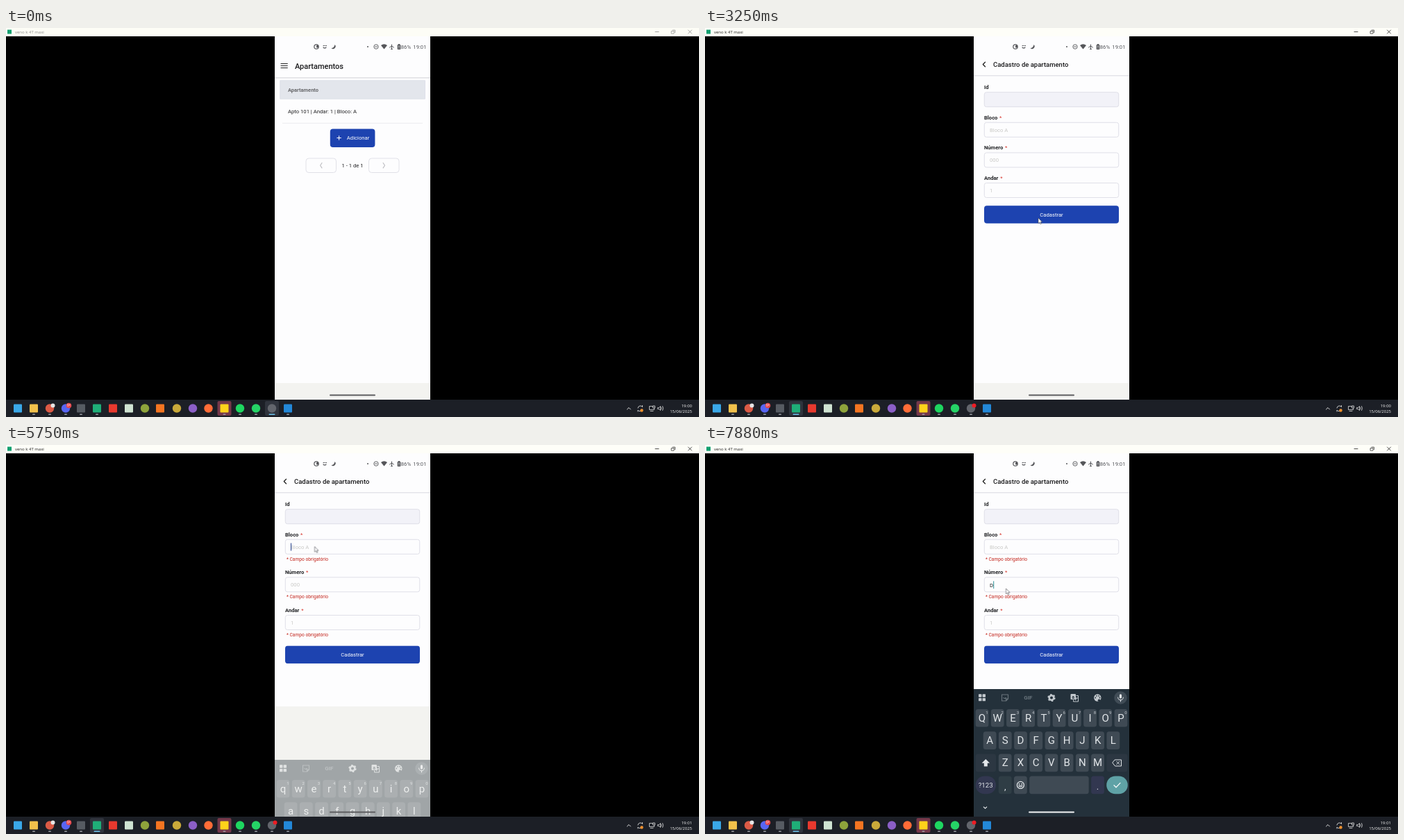
An HTML page that plays this animation: 998x561 px, repeating every 8 s.

```html
<!DOCTYPE html>
<html lang="pt-BR">
<head>
<meta charset="utf-8">
<title>Cadastro de apartamento</title>
<style>
html, body { margin: 0; width: 100%; height: 100%; overflow: hidden; background: #000; }
svg { display: block; width: 998px; height: 561px; font-family: Roboto, sans-serif; }
.desk { font-family: "Open Sans", sans-serif; font-size: 6px; }
.line { fill: none; stroke-linecap: round; stroke-linejoin: round; }
.anim { animation: 8s step-end infinite; }

/* percentages are ms / 80, set just ahead of each 125 ms tick */
#list, #form { transform-origin: 499px 274.5px; }
#list { animation-name: zoomOut; }
#form { opacity: 0; animation-name: zoomIn; }
@keyframes zoomOut { 18.6% { transform: scale(1.08); } 20.2% { transform: scale(1.14); } 23.3%, 100% { transform: scale(1.15); } }
@keyframes zoomIn {
  0% { opacity: 0; transform: scale(.9); }
  20.2% { opacity: 1; transform: scale(.975); }
  21.8% { opacity: 1; transform: scale(.995); }
  23.3%, 100% { opacity: 1; transform: none; }
}

.shift { animation-name: shift; }
@keyframes shift { 46.8%, 100% { transform: translateY(var(--d)); } }
.error { opacity: 0; animation-name: error; }
@keyframes error { 46.8%, 100% { opacity: 1; } }

.idle { animation-name: idle; }
.active { opacity: 0; animation-name: active; }
@keyframes idle { 14%, 100% { opacity: 0; } }
@keyframes active { 14%, 100% { opacity: 1; } }
.rec { opacity: 0; animation-name: rec; }
@keyframes rec { 1.5%, 100% { opacity: 1; } }
.before { animation-name: before; }
.after { opacity: 0; animation-name: after; }
@keyframes before { 67.1%, 100% { opacity: 0; } }
@keyframes after { 67.1%, 100% { opacity: 1; } }

#gap { transform: translateY(160px); animation-name: gap; }
@keyframes gap { 71.7% { transform: translateY(25px); } 73.3%, 100% { transform: none; } }
#keyboard { opacity: 0; animation-name: rise; }
@keyframes rise {
  0% { opacity: 0; transform: translateY(184px); }
  71.7% { opacity: .4; transform: translateY(102px); }
  73.3% { opacity: .88; transform: translateY(22px); }
  74.8%, 100% { opacity: 1; transform: none; }
}
#home { fill: #5c5c5f; animation-name: home; }
@keyframes home { 73.3%, 100% { fill: #f4f6f7; } }

.lower { animation-name: lower; }
.upper { opacity: 0; animation-name: upper; }
@keyframes lower { 90.4%, 100% { opacity: 0; } }
@keyframes upper { 90.4%, 100% { opacity: 1; } }
.empty { animation-name: empty; }
.typed { opacity: 0; animation-name: typed; }
@keyframes empty { 95.1%, 100% { opacity: 0; } }
@keyframes typed { 95.1%, 100% { opacity: 1; } }
#caretA { opacity: 0; animation-name: caretA; }
@keyframes caretA { 68.6% { opacity: 1; } 74.9%, 100% { opacity: 0; } }
#caretB { opacity: 0; animation-name: caretB; }
@keyframes caretB { 82.7% { opacity: 1; } 88.9% { opacity: 0; } 95.1%, 100% { opacity: 0; } }

#cursor { animation-name: cursor; }
@keyframes cursor {
  0% { opacity: 0; transform: translate(470px, 420px); }
  4.6% { opacity: 1; transform: translate(470px, 420px); animation-timing-function: steps(5); }
  12.4% { opacity: 1; transform: translate(492px, 152px); }
  23.3% { opacity: 1; transform: translate(492px, 152px); animation-timing-function: steps(8); }
  35.8% { opacity: 1; transform: translate(480px, 274px); }
  46.8% { opacity: 1; transform: translate(478px, 271px); }
  60.8% { opacity: 1; transform: translate(478px, 271px); animation-timing-function: steps(5); }
  68.6% { opacity: 1; transform: translate(444.5px, 146.5px); }
  74.9% { opacity: 1; transform: translate(444.5px, 146.5px); animation-timing-function: steps(4); }
  79.6% { opacity: 1; transform: translate(433.5px, 201px); }
  88.9%, 100% { opacity: 1; transform: translate(433.5px, 207px); }
}
</style>
</head>
<body>
<svg id="stage" viewBox="0 0 998 561"></svg>
<script>
const BLUE = '#1d43b0';
const rect = (x, y, w, h, fill, r = 0, more = '') =>
  `<rect x="${x}" y="${y}" width="${w}" height="${h}" rx="${r}" fill="${fill}" ${more}/>`;
const dot = (x, y, r, fill, more = '') => `<circle cx="${x}" cy="${y}" r="${r}" fill="${fill}" ${more}/>`;
const line = (d, stroke, w = 1, more = '') =>
  `<path class="line" d="${d}" stroke="${stroke}" stroke-width="${w}" ${more}/>`;
const text = (x, y, s, size, fill, more = '') =>
  `<text x="${x}" y="${y}" font-size="${size}" fill="${fill}" ${more}>${s}</text>`;
const group = (cls, body, more = '') => `<g class="anim ${cls}" ${more}>${body}</g>`;
const MID = 'text-anchor="middle"', END = 'text-anchor="end"';
const BOLD = 'font-weight="700"', MEDIUM = 'font-weight="500"';
const page = rect(387, 12, 224, 524, '#fdfdfe');

function titleBar() {
  const face = (bg, ink) => rect(0, 0, 998, 12, bg) + rect(2, 2.5, 6, 6, '#11a070') +
    text(13, 8.2, 'veno k 4T maxi', 6, ink) +
    line('M935 5.5h5M982.500 3l5 5m0-5l-5 5', ink, .8) +
    line('M958.500 4.500h3.500v3.500h-3.500zM960 3h3.500v3.500', ink, .7);
  return `<g class="desk">${group('idle', face('#fdfdf6', '#8c8c8c'))}${group('active', face('#fefef8', '#222'))}</g>`;
}

function taskbar() {
  const apps = [
    [17, '#3aa8e8'], [40, '#f2c14b'], [63, '#db5a45', 1], [86, '#5865f2', 1], [108, '#565b62'], [131, '#1fae78'],
    [154, '#e8392e'], [177, '#cfe3d2'], [200, '#8ea33b', 1], [222, '#f47521'], [246, '#c9a93a', 1], [269, '#8b5fc7', 1],
    [291.5, '#ff6c37', 1], [314.5, '#ffd21a'], [337, '#1ed760', 1], [360, '#25d366', 1], [383, '#62656c', 1], [406, '#2388d8']
  ];
  const running = [40, 63, 86, 108, 314.5, 337, 360, 406];
  const tab = x => rect(x - 10, 538, 20, 21, '#30343d', 2);
  const short = x => rect(x - 2, 556.6, 4, 1.4, '#9a9da3', .7);
  const wide = x => rect(x - 4.5, 556.6, 9, 1.4, '#6cc4ee', .7);
  const clock = time => text(988, 546.6, time, 6, '#f2f2f2', END);
  const grey = '#e0e0e0';
  return '<g class="desk">' + rect(0, 536, 998, 25, '#1c1f26') +
    rect(304.5, 538, 20, 21, '#75384a', 2) +
    group('idle', tab(383) + wide(383) + short(131)) +
    group('active', tab(131) + wide(131) + short(383)) +
    apps.map(([x, c, round]) => round ? dot(x, 548.5, 6.2, c) : rect(x - 6, 542.5, 12, 12, c, 1)).join('') +
    running.map(short).join('') +
    dot(67.5, 544.5, 3, '#e6e6e6') + dot(90.5, 544.5, 3.8, '#e5484d') +
    text(90.5, 546.2, '9+', 4.5, '#fff', MID) +
    group('rec', dot(387.5, 544.5, 3, '#ee1c24')) +
    line('M894.500 550l2.500-2.500 2.500 2.500', grey, 1) +
    line('M910 548a3.600 3.600 0 0 1 6.500-1.500v-2M916.500 550a3.600 3.600 0 0 1-6.500 1v2', grey, .9) +
    dot(915.5, 551.5, 2.2, '#f0902c') +
    line('M932 545.500h-5.500v5h7v-2M928 552.500h4M932 545h2.500v3h-2.500z', grey, .8) +
    line('M939 547.500h1.500l2-2v6l-2-2h-1.500zM944 547q1 1.500 0 3M945.700 545.500q2 3 0 6', grey, .8) +
    group('before', clock('19:00')) + group('after', clock('19:01')) +
    text(988, 554.6, '15/06/2025', 6, '#f2f2f2', END) + '</g>';
}

function statusBar() {
  const c = '#55565a';
  return dot(447, 27, 3.2, 'none', `stroke="${c}" stroke-width="1.2"`) + rect(447, 25, 3, 3.5, c, 1) +
    line('M457 25.500h1.500m1.500 0h1.500M457 28q2 2 4 0', c, 1.1) +
    `<path d="M473.500 24a3.500 3.500 0 1 1-5 5q4 0 5-5z" fill="${c}"/>` +
    dot(521, 27, 1, c) + dot(533, 27, 3.2, 'none', `stroke="${c}" stroke-width=".9"`) + line('M531.500 27h3', c, .9) +
    `<path d="M540 25q4.500-3.500 9 0l-4.500 5.500z" fill="${c}"/>` +
    line('M555.500 24v6.500m-3-2.500l3-2 3 2m-4 2.500h2', c, 1) +
    rect(563.7, 24, 4.6, 7, c, .8) + rect(565, 23, 2, 1.2, c) + line('M566 25.500v2.500m0 1.400v.1', '#fff', .8) +
    text(568.8, 29.8, '86%', 7.7, c) + text(605.5, 29.8, '19:01', 7.7, c, END);
}

function listPage() {
  const pager = (x, d) => rect(x, 188, 43.5, 20.5, '#fdfdfe', 4, 'stroke="#dadae2" stroke-width=".8"') +
    line(`M${x + 21.8 - d} 194.500l${2 * d} 3.700l${-2 * d} 3.700`, '#bcbcc0', 1.1);
  return page + rect(387, 71, 224, 1.6, '#e1e1e5') +
    line('M396 51.500h9.300m-9.300 3h9.300m-9.300 3h9.300', '#222', 1.2) +
    text(416, 58.8, 'Apartamentos', 11, '#1b1b1d', MEDIUM) +
    rect(394.8, 75.8, 208.6, 26.4, '#e3e6ec', 0, 'stroke="#d6d9e4" stroke-width=".7"') +
    text(406, 92, 'Apartamento', 7.5, '#68696c', BOLD) +
    text(406, 122.6, 'Apto 101 | Andar: 1 | Bloco: A', 7.68, '#1d1d1f') +
    rect(398, 136.8, 202, .8, '#e6e6ec') +
    rect(466.8, 145.5, 64.6, 26.5, BLUE, 4) + line('M476.800 158.500h5.600m-2.800-2.800v5.600', '#fff', 1) +
    text(490.8, 161.2, 'Adicionar', 7.68, '#fff') +
    pager(432, -1.2) + pager(522.5, 1.2) + text(499, 201, '1 - 1 de 1', 7.68, '#1d1d1f', MID);
}

function field(y, label, hint, width, cls = '') {
  const box = rect(402.3, y + 7.3, 193.4, 21, hint ? '#fdfdfe' : '#f2f2f8', 3, 'stroke="#d9d9e2" stroke-width=".8"');
  const star = hint ? text(402 + width, y + 2.7, '*', 7.7, '#d8392f') : '';
  const error = hint ? group('error', text(404, y + 38, '* Campo obrigatório', 6.68, '#c4261d')) : '';
  return text(402, y + 2.7, label, 7.6, '#222326', BOLD) + star + box + error +
    group(cls, text(410, y + 20.7, hint, 7.7, '#c9c9c6'));
}

function formPage() {
  const moved = (d, body) => group('shift', body, `style="--d:${d}px"`);
  return page + rect(387, 68, 224, 1.4, '#e3e3e8') +
    line('M403.500 49.200l-3.200 3.300 3.200 3.300', '#222', 1.3) +
    text(415, 56, 'Cadastro de apartamento', 9.5, '#1b1b1d', MEDIUM) +
    field(85.4, 'Id', '', 0) + field(129, 'Bloco', 'Bloco A', 22) +
    moved(10.9, field(172.6, 'Número', '000', 30, 'empty')) +
    moved(22, field(216.2, 'Andar', '1', 23.3)) +
    moved(33.4, rect(402, 256.2, 194, 25.6, BLUE, 4) + text(499, 271.7, 'Cadastrar', 7.68, '#fff', MID)) +
    group('typed', text(410, 204.6, 'D', 7.7, '#1d1d1f') + rect(415.2, 196.3, 1, 10.8, '#2a8f96')) +
    rect(410, 141.500, 1, 11, '#24408c', 0, 'class="anim" id="caretA"') +
    rect(410, 196.3, 1, 10.8, '#24408c', 0, 'class="anim" id="caretB"');
}

function keyboard() {
  const ink = '#e3e7ea', soft = '#c3c9ce', dim = '#6a757d', key = '#3f4a54', dark = '#2c3742', bg = '#24313b';
  const step = 22.22;
  const rows = [['qwertyuiop', 399, 381], ['asdfghjkl', 410.1, 413.3], ['zxcvbnm', 432.2, 445.6]];
  const each = fn => rows.map(([s, x, y]) => [...s].map((c, i) => fn(c, x + i * step, y, i)).join('')).join('');
  const letters = fn => each((c, x, y) => text(x, y + 17.800, fn(c), 15, ink, MID));
  const arrow = 'M404.300 453l5.700 5.800h-3.200v4.700h-5v-4.700h-3.200z';
  const digits = [...'1234567890'].map((n, i) => text(406 + i * step, 387.5, n, 6, soft, MID)).join('');
  const tools =
    [0, 1, 2, 3].map(i => rect(394 + i % 2 * 5.6, 359.3 + (i >> 1) * 5.6, 4.4, 4.4, soft, .6)).join('') +
    line('M427.500 360h9v6l-3 3h-6zM433.500 369v-3h3M429.800 364.500q1.700 2 3.600 0', dim, 1.1) +
    text(465.3, 367.4, 'GIF', 8, dim, MID + ' ' + BOLD) +
    dot(499, 364.500, 3.3, 'none', `stroke="${soft}" stroke-width="2.6"`) +
    dot(499, 364.500, 4.800, 'none', `stroke="${soft}" stroke-width="1.6" stroke-dasharray="2.500 2.527"`) +
    rect(526.5, 359, 7.5, 8, soft, 1) + text(530.2, 365.5, 'a', 6.5, bg, MID + ' ' + BOLD) +
    line('M535 361.500h2.500v8.500h-7v-2M533.500 365h3m-1.500 0q-.5 2-1.500 3', soft, 1) +
    dot(565.3, 364.5, 5.2, soft) +
    [[562.3, 364.5], [564, 361.8], [567, 361.8], [568.5, 364.5]].map(p => dot(...p, .9, bg)).join('') + dot(567.5, 368.2, 1.8, bg) +
    dot(598.5, 364.5, 9.3, '#404c56') + rect(596.9, 359.3, 3.2, 6.3, ink, 1.6) +
    line('M594.700 364a3.800 3.800 0 0 0 7.600 0M598.500 368v2', ink, 1);
  return rect(387, 352, 224, 184, bg) + tools +
    each((c, x, y) => rect(x - 9.4, y, 18.8, 25.6, key, 3.5)) + digits +
    group('lower', letters(c => c) + line(arrow, ink, 1.1)) +
    rect(389.6, 445.6, 29.5, 25.6, dark, 3.5) + rect(578.5, 445.6, 30, 25.6, dark, 3.5) +
    group('lower', line(arrow, ink, 1.1)) +
    group('upper', letters(c => c.toUpperCase()) + `<path d="${arrow}" fill="${ink}"/>`) +
    line('M590.500 454h9v9h-9l-3.500-4.500zM592.800 456.500l4 4m0-4l-4 4', ink, 1) +
    rect(389.6, 477.6, 29.5, 25.6, '#323750', 12.8) + text(404.2, 494, '?123', 9.6, ink, MID) +
    rect(422.8, 477.6, 18.8, 25.6, '#2f3d45', 3.5) + text(432.2, 496.5, ',', 13, ink, MID) +
    rect(445, 477.6, 18.8, 25.6, key, 3.5) +
    dot(454.4, 490.4, 5, 'none', `stroke="${ink}" stroke-width="1.3"`) +
    dot(452.6, 489, .9, ink) + dot(456.2, 489, .9, ink) + line('M451.800 491.700q2.600 3 5.200 0z', ink, 1) +
    rect(467.2, 477.6, 85.5, 25.6, key, 3.5) +
    rect(556.1, 477.6, 18.8, 25.6, '#323750', 3.5) + text(565.5, 496.5, '.', 13, ink, MID) +
    rect(578.2, 477.6, 30.6, 25.6, '#5fa2a6', 12.8) + line('M589 490.700l3 3 6-6.300', '#f4f8f8', 1.3) +
    line('M401.300 522l2.200 2.200 2.200-2.200', ink, 1.1);
}

document.getElementById('stage').innerHTML =
  '<clipPath id="screen"><rect x="387" y="12" width="224" height="524"/></clipPath>' +
  rect(0, 0, 998, 561, '#000') +
  '<g clip-path="url(#screen)">' + page +
  group('', listPage(), 'id="list"') + group('', formPage(), 'id="form"') + statusBar() +
  group('', rect(387, 352, 224, 184, '#f3f3f0'), 'id="gap"') +
  group('', keyboard(), 'id="keyboard"') +
  rect(466, 528.5, 66, 2, '', 1, 'class="anim" id="home"').replace('fill=""', '') + '</g>' +
  titleBar() + taskbar() +
  group('', '<path d="M0 0v7.800l1.800-1.600 1.300 2.700 1.300-.6-1.300-2.600h2.400z" fill="#fff" stroke="#44464c" stroke-width=".6"/>', 'id="cursor"');
</script>
</body>
</html>
```
